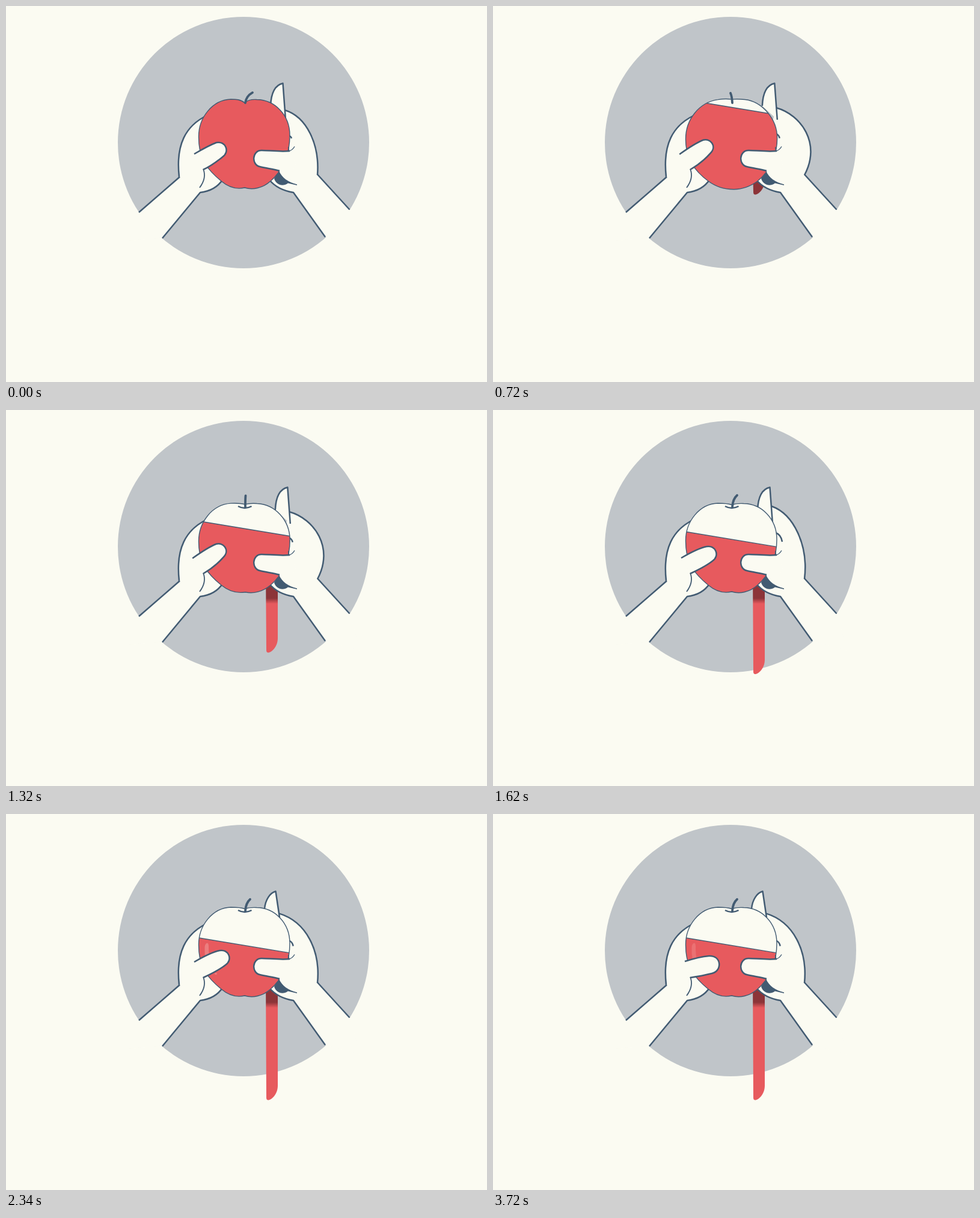
An HTML page for the animation above (3780 ms loop, 800 by 625 pixels).

```html
<!DOCTYPE html>
<html lang="en">
<head>
<meta charset="utf-8">
<title>Peeling an apple</title>
<style>
  html, body { margin: 0; width: 100%; height: 100%; overflow: hidden; background: #fbfbf2; }
  svg { display: block; width: 800px; height: 625px; }
  .skin { fill: #fbfbf2; }
  .ink { fill: #425b72; }
  .red { fill: #e75a5e; }
  .line { fill: none; stroke: #425b72; stroke-width: 2.5; stroke-linejoin: round; }
  .thin { stroke-width: 1.4; }
  .stem { stroke-width: 3.8; stroke-linecap: round; }
</style>
</head>
<body>
<svg viewBox="0 0 800 625">
  <defs>
    <clipPath id="inside"><path id="clip"/></clipPath>
    <linearGradient id="shade" gradientUnits="userSpaceOnUse" x1="0" y1="313" x2="0" y2="322">
      <stop stop-color="#8c3438"/><stop offset="1" stop-color="#e75a5e"/>
    </linearGradient>
  </defs>
  <circle cx="395" cy="227" r="209" fill="#c0c5c9"/>
  <path id="peel" fill="url(#shade)"/>

  <!-- left arm -->
  <path class="skin" d="M334 182C299 199 282 230 288 284L221 343L205 390L260 386L323 310C340 308 352 301 360 289"/>
  <path class="line" d="M334 182C299 199 282 230 288 284M289 284L221 343M260 386L323 310C340 308 352 301 360 289"/>

  <!-- right arm -->
  <path class="skin" id="palm"/>
  <path class="line" id="back"/>
  <path class="line" d="M518 280L571.500 338.500M531 384L478 310C460 307 447 300 438 289"/>
  <path class="skin" id="finger"/>
  <path class="line" id="fingerLine"/>
  <path class="line" id="fold"/>
  <path class="ink" d="M454 274L446 287C449 297 460 301 469 294.500L484 298V296.500C470 293 459 286 454 274Z"/>

  <!-- apple -->
  <path class="skin" id="flesh"/>
  <g clip-path="url(#inside)">
    <path class="red" id="rind"/>
    <path class="line thin" id="cut"/>
    <g id="shine" class="skin">
      <path d="M330.500 222Q331 214.500 335 214.500Q337.500 215 337 224Q337 233 339 242H332Q330 232 330.500 222Z"/>
      <ellipse cx="349" cy="265.500" rx="2" ry="1.500"/>
    </g>
  </g>
  <path class="line thin" id="outline"/>
  <path class="line" id="calyx" d="M386 160Q397 166 408.500 160"/>
  <path class="line stem" id="stem"/>

  <!-- thumbs -->
  <path class="skin" id="thumb"/>
  <path class="line" id="thumbLine"/>
  <path class="line" d="M328 271C333 283 328 294 322 302" style="stroke-width:1.8"/>
  <path class="skin" d="M472 241C455 242.500 436 240 425 240C409 240 408 264 422 267C434 270 445 271 454 274L470 290L482 262Z"/>
  <path class="line" d="M472 241C455 242.500 436 240 425 240C409 240 408 264 422 267C434 270 445 271 455 274"/>
  <path class="line thin" d="M469 241.500Q476 240.500 480 233.500M469.500 234.500L470.500 240"/>
</svg>
<script>
const LOOP = 3780, STEP = 60, TURN = 600, TURNS = 3;
const $ = id => document.getElementById(id);
const put = (id, d) => $(id).setAttribute('d', d);
const ramp = (t, from, to) => Math.min(1, Math.max(0, (t - from) / (to - from)));

// Straight moves through [time, value] points
const track = (t, points) => points.reduce((v, [time, value], i) => {
  const [t0, v0] = points[i - 1] || [time - 1, value];
  return t > t0 ? v0 + (value - v0) * ramp(t, t0, time) : v;
}, points[0][1]);

// k: 0 is lobed, 1 is round; dip lowers the hollow at the stem
const appleShape = (k, dip) =>
  `M397 ${157.5 + dip - 3.5 * k}C390 ${155 - k} 382 ${155 - k} 374 ${155 + k}` +
  `C343 ${156 + 6 * k} 320 ${186 + 4 * k} 320.5 ${218 + 6 * k}` +
  `C320.5 ${255 - 2 * k} 335 ${272 + 3 * k} 358 291` +
  `C371 ${302 - 2 * k} 384 305 ${397 + 6 * k} ${302 + 4 * k}` +
  `C${410 + 6 * k} ${306 - 2 * k} ${427 + 3 * k} ${303 - 5 * k} 440 291` +
  `C${460 + 2 * k} 274 ${472 + k} 247 ${472 + k} ${215 + 7 * k}` +
  `C${472 + k} ${181 + 9 * k} 447 ${156 + 4 * k} ${417 + 3 * k} 155.5` +
  `C409 ${155 - k} 402 ${156 - 2 * k} 397 ${157.5 + dip - 3.5 * k}Z`;

// press swings the thumb down, reach makes it longer
const thumbShape = (press, reach) => {
  const a = press, b = 5 * (reach - 1);
  return `M${313 + 6 * a} ${246 - a}` +
    `C${330 + 5 * a} ${236 + 4 * a} ${342 + 5 * a} ${230 + 7 * a} ${355 + 4 * a + b} ${227 + 9 * a}` +
    `C${370 + 10 * a + b} ${224 + 10 * a} ${378 + 4 * a + b} ${242 + 19 * a} ${365 - a + b} ${251 + 14 * a}` +
    `C${355 - 3 * a + b} ${259 + 9 * a} ${343 - 2 * a} ${265 + 5 * a} 328 272`;
};

function drawApple(t) {
  const round = track(t, [[0, 0], [420, 1], [1020, .35], [1620, 0]]);
  const shape = appleShape(round, 3.5 * (1 - ramp(t, 0, 420)));
  for (const id of ['clip', 'flesh', 'outline']) put(id, shape);

  const x = track(t, [[0, 411], [420, 400], [1020, 388], [1620, 407]]);
  const y = 140 + (x - 403) ** 2 * .045;
  put('stem', `M398 161Q${398 + (x - 398) * .1} ${y + 7} ${x - Math.sign(x - 398)} ${y + 1}`);

  const cut = track(t, [[0, 130], [420, 158], [600, 161], [1020, 187], [1200, 190], [1620, 215], [1740, 218.5]]);
  const edge = `M300 ${cut - 16}L500 ${cut + 17}`;
  put('cut', edge);
  put('rind', edge + 'V320H300Z');
  $('calyx').style.opacity = cut > 170 ? 1 : 0;

  const end = track(t, [[600, 291], [1020, 369.5], [1140, 389], [1200, 389], [1620, 439], [1740, 475.5]]);
  put('peel', `M432 262H452V${end - 24}C452 ${end - 10} 442 ${end} 436 ${end}Q433 ${end} 433 ${end - 4}Z`);
  $('shine').style.opacity = ramp(t, 2220, 2760) - ramp(t, 3360, 3780);
}

function drawHands(t) {
  const turning = t < TURN * TURNS, phase = t % TURN;
  const stroke = Math.sin(Math.PI * ramp(phase, 0, 420));
  const settle = ramp(t, 1800, 2340);
  const swing = turning ? stroke : 0;
  const grip = turning ? ramp(phase, 0, 420) - ramp(phase, 420, 540) : settle * .45;

  const dx = 10 * swing - 10 * settle;
  const finger = `M${440 + dx} ${166 - 8 * settle}C${441 + dx} 143 ${449 + dx} 131 ` +
    `${460.5 + dx - 2 * settle} 128.5L${465 + dx} ${189 - 17 * settle}`;
  const back = `M${463.5 + dx} ${173 - 13 * grip - 2 * settle}C${500 + 16 * swing} ${184 - 11 * grip} ` +
    `${522 + 30 * swing + 3 * grip} ${230 - 5 * grip} 518 281`;
  put('finger', finger + 'Z');
  put('fingerLine', finger);
  put('back', back);
  put('palm', back + 'L571 338L590 400L531 384L478 310C460 307 447 300 438 288Z');
  put('fold', `M${472 - 2 * grip} ${216 - 12 * grip}Q${474 + 5 * grip} ${217 - 10 * grip} ${475 + 6 * grip} ${220 - grip}`);

  const press = t < 2340 ? -.6 * stroke : track(t, [[2340, 0], [2580, 1], [2820, -.5], [2880, -.5], [3060, 1]]);
  const thumb = thumbShape(press, Math.max(grip, settle));
  put('thumb', thumb + 'Z');
  put('thumbLine', thumb);
}

const start = performance.now();
function frame(now) {
  const t = Math.floor((Math.max(0, now - start) % LOOP) / STEP) * STEP;
  drawApple(t);
  drawHands(t);
  requestAnimationFrame(frame);
}
frame(start);
</script>
</body>
</html>
```
